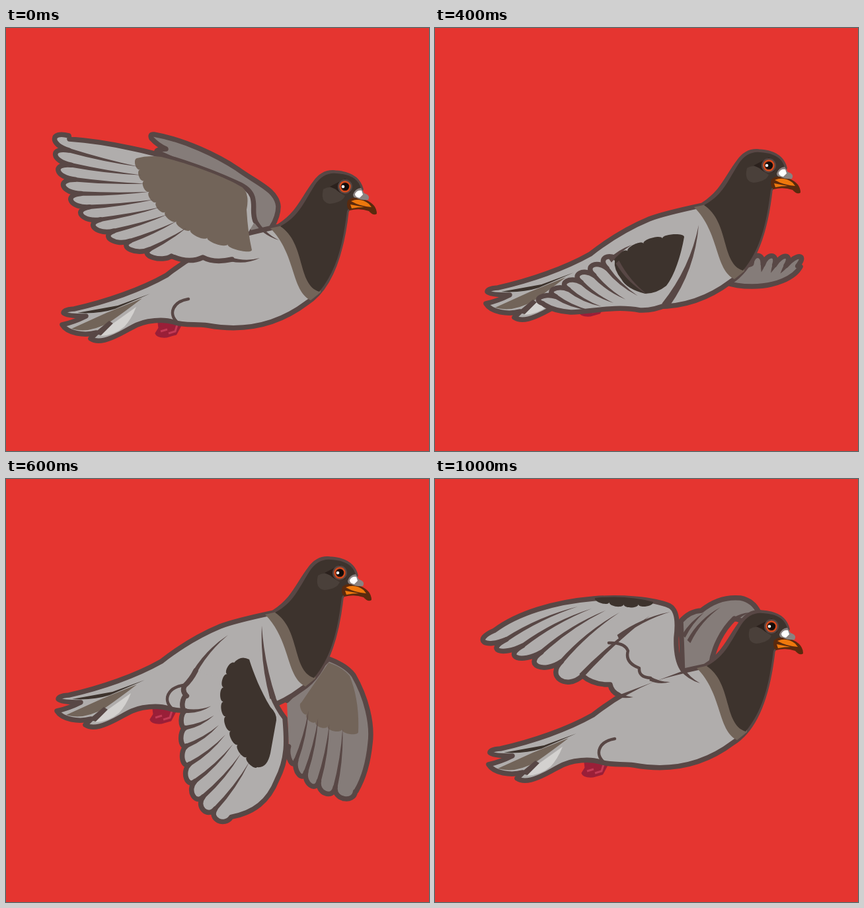
Recreate the animation shown at these times as an HTML page. Size 640 by 640 pixels, loop 1100 ms.

```html
<!DOCTYPE html>
<html lang="en">
<head>
<meta charset="utf-8">
<title>Flying pigeon</title>
<style>
html, body { margin: 0; width: 100%; height: 100%; overflow: hidden; background: #e53530; }
svg { display: block; width: 100vw; height: 100vh; }
.pose { visibility: hidden; animation: short 1100ms step-end infinite; }
.pose.held { animation-name: long; }
@keyframes short { 0% { visibility: visible; } 9.0909%, 100% { visibility: hidden; } }
@keyframes long { 0% { visibility: visible; } 18.1818%, 100% { visibility: hidden; } }
.edge { stroke: #584745; stroke-width: 7.5; stroke-linejoin: round; stroke-linecap: round; }
.thin { fill: none; stroke-width: 4.5; }
.plume { fill: #b0adac; }
.shade { fill: #857c79; }
.brown { fill: #726459; }
.dark { fill: #3d332d; }
.ink { fill: #584745; }
</style>
</head>
<body>
<svg viewBox="0 0 640 640">
  <defs>
    <g id="body">
      <path fill="#9a1f38" stroke="#9a1f38" stroke-width="3" stroke-linejoin="round" d="M231 446L232 454 227 462Q229 468 243 467L257 463 265 448Z"/>
      <path fill="none" stroke="#c23a55" stroke-width="3" d="M259 449L256 459 246 462M234 459L244 456"/>
      <path class="plume edge" d="M413 300C385 306 352 313 332 321C296 336 266 356 243 374C204 396 152 414 103 425Q87 426 87 431Q91 436 121 436Q103 445 85 449C93 462 118 466 137 461L128 470C140 478 158 470 172 463C188 455 198 447 215 444Q238 440 254 445C270 451 288 447 305 450C360 460 410 450 455 416C490 394 508 340 515 277L537 244Q531 221 498 219Q480 217 468 234C450 257 444 280 413 300Z"/>
      <path class="dark" d="M108 431L169 420 218 402 165 425Q140 433 108 431Z"/>
      <path class="brown" d="M99 455L152 431 206 409Q180 429 157 445Q125 463 99 455Z"/>
      <path class="ink" d="M133 462L156 443 162 447 144 465Z"/>
      <path fill="#d3d1cf" d="M143 466L162 447 197 422Q190 440 179 452Q164 465 143 466Z"/>
      <path class="brown" d="M400 303L418 299Q480 340 476 400L461 412C431 397 439 342 400 303Z"/>
      <path class="dark" d="M415 300C443 285 450 265 467 238Q480 218 500 220Q532 222 537 243L516 277C510 324 502 365 474 399C440 388 454 326 415 300Z"/>
      <path fill="#4a403a" d="M480 244Q491 237 501 246L513 254Q509 264 490 266Q475 264 480 244Z"/>
      <path class="edge thin" d="M258 444C246 432 252 414 276 410"/>
      <path fill="#2b211d" d="M490 240Q500 235 513 228Q529 235 521 249Q510 255 499 244Z"/>
      <circle class="ink" cx="513" cy="240" r="11"/>
      <circle cx="513" cy="240" r="7.5" fill="#2b1511" stroke="#d84b1c" stroke-width="2.4"/>
      <circle cx="514" cy="240" r="4.8" fill="#120c0a"/>
      <circle cx="510" cy="240" r="2.3" fill="#fff"/>
      <path fill="#5a2a0e" d="M517 261Q526 253 544 260Q561 267 561 281Q556 285 549 277Q535 272 520 276Q514 271 517 261Z"/>
      <path fill="#ee780d" d="M522 262Q536 256 549 266L553 271Q536 270 522 262ZM521 267L542 271Q532 271 523 273Z"/>
      <path fill="#8a8281" d="M525 252Q528 243 537 242L542 250Q552 253 548 260Q538 261 530 257Q525 257 525 252Z"/>
      <path fill="#fff" d="M528 251Q531 245 538 246L540 252 535 257Q528 256 528 251Z"/>
    </g>
  </defs>
  <g id="stage"></g>
</svg>
<script>
// tips, roots and edge are Bezier curves: where feathers end, where their quills fade, and the patch's scalloped side.
const backswept = {
  far: { lead: 'M224 161C270 169 320 193 350 213C380 235 410 245 412 270Q412 285 402 301L385 330 300 220 229 188Q224 184 242 183Q229 177 220 167Q217 160 224 161Z' },
  near: {
    lead: 'M377 292C372 278 377 270 373 256Q369 243 350 235C300 212 240 192 190 182Q140 171 96 168',
    tips: '74 156 68 235 110 324 242 352', count: 10, depth: .17, reach: .75, bend: 3,
    trail: 'Q277 357 298 347Q315 356 342 350',
    edge: '198 197 212 255 240 310 372 336', scallops: 10,
    patch: 'Q366 310 364 275Q370 245 352 238C330 225 280 206 235 195Q215 192 198 197',
    accents: ['376 289 413 321 9', '340 350 384 348 7']
  }
};
const raised = {
  far: {
    lead: 'M375 335L408 318Q412 285 400 272C350 240 313 198 287 160',
    tips: '278 140 216 222', roots: '318 207 256 289', count: 4, depth: .3, vein: .25
  },
  near: {
    lead: 'M380 311C372 298 379 285 362 278C330 268 290 255 250 234C215 215 180 196 157 184',
    tips: '145 152 50 250 100 372 225 388', count: 10, depth: .17, reach: .75, bend: 3,
    trail: 'Q255 392 271 385Q285 396 305 387Q320 392 342 387',
    edge: '207 237 217 285 240 350 386 364', scallops: 10,
    patch: 'Q378 345 370 318Q370 290 355 284C330 278 290 268 240 245Q220 233 207 237',
    accents: ['378 308 411 345 10', '340 387 401 373 7']
  }
};
const flat = {
  far: {
    lead: 'M440 385Q455 391 480 391C515 391 544 378 553 361',
    tips: '562 346 478 344', roots: '525 385 480 380', count: 4, depth: .36, vein: .5, trail: 'L470 360'
  },
  near: {
    lead: 'M352 418Q330 428 310 427C270 419 230 431 205 430Q180 428 166 419',
    tips: '150 413 268 341', roots: '215 432 325 400', count: 6, depth: .2, bend: 6,
    edge: '377 316 330 315 295 332 272 352', scallops: 4, tone: 'dark',
    patch: 'Q270 365 282 380Q290 395 318 402Q335 402 350 390C362 375 372 345 377 316',
    accents: ['276 354 321 403 8', '265 352 298 328 -4', '349 419 399 298 17 12']
  }
};
const lowered = {
  far: {
    lead: 'M425 335L488 272Q515 282 526 297C545 330 555 370 551 400C548 430 540 455 530 472',
    tips: '528 486 470 480 440 455 425 415', roots: '533 385 490 372 465 365 445 335', count: 5, depth: .13, bend: 5,
    edge: '447 338 455 375 490 375 533 383', scallops: 5,
    patch: 'Q535 335 520 298Q510 285 488 278L447 338'
  },
  near: {
    lead: 'M287 290Q280 304 270 313Q266 321 273 328',
    tips: '268 328 262 385 255 500 335 522', roots: '310 330 305 365 350 410 380 440', count: 8, depth: .13, bend: 6,
    trail: 'C375 505 397 488 410 455C428 420 424 390 422 362Q410 347 402 326',
    edge: '345 278 310 320 335 400 380 436', scallops: 8, tone: 'dark',
    patch: 'Q395 438 400 415L409 365Q410 355 400 345C385 320 375 295 368 273Q355 266 345 278',
    accents: ['285 293 336 236 -8', '404 332 387 222 -8 9']
  }
};
const folded = {
  far: {
    lead: 'M395 270L398 208Q430 193 445 198Q455 205 454 222Q448 242 430 262L400 278ZM468 378L488 361Q497 377 490 382Q480 384 468 378Z',
    accents: ['398 263 446 211 -13']
  },
  near: {
    lead: 'M391 277Q389 250 396 208Q400 192 388 189C360 179 325 183 300 192C260 208 222 229 200 248',
    tips: '186 250 195 330 235 400 315 442', roots: '240 240 300 235 315 250 312 260', count: 5, depth: .25, bend: -9,
    edge: '297 198 285 225 300 255 320 255', scallops: 4, tone: 'dark',
    patch: 'Q335 230 358 207Q375 193 393 190C365 183 330 183 297 198',
    accents: ['314 397 386 213 -26 9', '389 270 397 290 0']
  }
};
const swept = {
  far: {
    lead: 'M375 300L372 215Q385 200 403 199Q430 177 462 180Q482 184 490 202L475 218 453 211C435 228 421 255 417 283Z',
    accents: ['376 238 407 202 -5', '384 246 432 194 -10', '453 213 476 202 -3']
  },
  near: {
    lead: 'M376 290Q364 275 365 240Q370 200 355 192C330 181 280 178 240 181C180 186 125 203 90 229',
    tips: '66 238 90 270 150 265 206 318', roots: '195 190 300 205', count: 5, depth: .18, bend: -9,
    trail: 'Q240 312 265 311Q267 322 278 327',
    edge: '242 180 285 196 330 186', scallops: 4, tone: 'dark', patch: 'Q290 175 242 180',
    accents: ['221 298 325 207 -7 8', '277 239 356 201 -9', '276 326 300 330 3', '373 287 401 309 5', '325 302 356 307 5'],
    inner: 'M263 248Q287 247 292 260Q287 278 309 286Q308 300 326 301'
  }
};
const poses = [
  { start: 0, at: [0, 0], wings: backswept },
  { start: 100, at: [-2, 20], wings: raised, near: 'translate(1 4) rotate(6 385 316)', far: 'translate(1 4) rotate(6 385 316)' },
  { start: 200, held: true, at: [-4, 16], wings: raised },
  { start: 400, at: [-8, -32], wings: flat },
  { start: 500, at: [-8, -65], wings: lowered, near: 'translate(0 33) rotate(25 385 240)', far: 'translate(0 33) rotate(-18 460 300)' },
  { start: 600, at: [-8, -98], wings: lowered },
  { start: 700, at: [-6, -61], wings: { near: folded.near, far: lowered.far }, near: 'translate(-2 -37) rotate(-25 392 220)', far: 'translate(2 37) rotate(-15 460 300)' },
  { start: 800, held: true, at: [-4, -24], wings: folded },
  { start: 1000, at: [-4, -17], wings: swept }
];

const mix = (a, b, t) => [a[0] + (b[0] - a[0]) * t, a[1] + (b[1] - a[1]) * t];
const range = n => Array.from({ length: n }, (_, i) => i);

function bezier(text, t) {
  const n = text.split(' ').map(Number);
  let points = range(n.length / 2).map(i => [n[2 * i], n[2 * i + 1]]);
  while (points.length > 1) points = points.slice(1).map((p, i) => mix(points[i], p, t));
  return points[0];
}

function normal(a, b) {
  const length = Math.hypot(b[0] - a[0], b[1] - a[1]);
  return [(a[1] - b[1]) / length, (b[0] - a[0]) / length];
}

const shift = (p, n, d) => [p[0] + n[0] * d, p[1] + n[1] * d];

// A rounded bulge from a to b that peaks at the given point.
function lobe(a, b, peak) {
  const m = mix(a, b, .5);
  const away = [peak[0] - m[0], peak[1] - m[1]];
  return `C${shift(a, away, 4 / 3)} ${shift(b, away, 4 / 3)} ${b}`;
}

// A stroke that is thick at a and fades out at b.
function taper(a, b, bend = 0, width = 6.5) {
  const n = normal(a, b), m = mix(a, b, .5);
  return `M${shift(a, n, width / 2)}Q${shift(m, n, bend + width / 3)} ${b}` +
    `Q${shift(m, n, bend - width / 3)} ${shift(a, n, -width / 2)}Z`;
}

function accent(text) {
  const [x1, y1, x2, y2, bend, width] = text.split(' ').map(Number);
  return taper([x1, y1], [x2, y2], bend, width);
}

function scalloped({ edge, scallops, patch }) {
  const joint = i => bezier(edge, i / scallops);
  return `M${joint(0)}` + range(scallops).map(i => {
    const a = joint(i), b = joint(i + 1);
    return lobe(a, b, shift(mix(a, b, .5), normal(a, b), 5));
  }).join('') + patch;
}

function wing(w, fill, transform = '') {
  let outline = w.lead, quills = (w.accents || []).map(accent).join('');
  if (w.tips) {
    const root = u => bezier(w.roots || w.edge, u * (w.reach || 1));
    const notch = i => mix(bezier(w.tips, i / w.count), root(i / w.count), w.depth);
    outline += `L${notch(0)}`;
    range(w.count).forEach(i => {
      outline += lobe(notch(i), notch(i + 1), bezier(w.tips, (i + .5) / w.count));
      if (i) quills += taper(notch(i), mix(notch(i), root(i / w.count), w.vein || 1), w.bend);
    });
    outline += w.trail || '';
  }
  return `<g transform="${transform}"><path class="${fill} edge" d="${outline}"/>` +
    (w.edge ? `<path class="${w.tone || 'brown'}" d="${scalloped(w)}"/>` : '') +
    `<path class="ink" d="${quills}"/>` +
    (w.inner ? `<path class="edge thin" d="${w.inner}"/>` : '') + '</g>';
}

document.getElementById('stage').innerHTML = poses.map(p =>
  `<g class="pose ${p.held ? 'held' : ''}" style="animation-delay:${p.start - 1100}ms">` +
  wing(p.wings.far, 'shade', p.far) +
  `<use href="#body" transform="translate(${p.at})"/>` +
  wing(p.wings.near, 'plume', p.near) + '</g>').join('');
</script>
</body>
</html>
```
